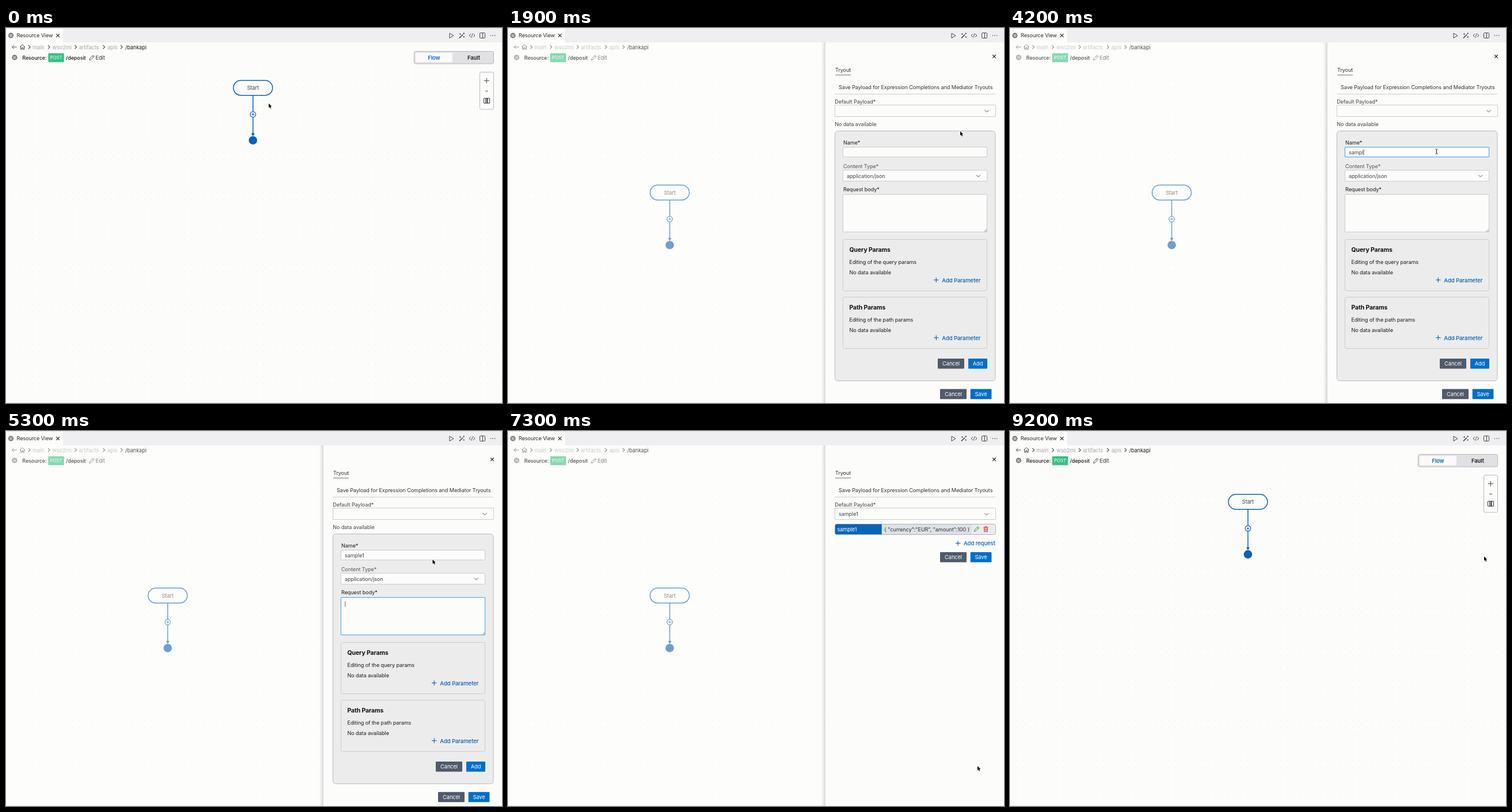
Recreate the animation shown at these times as an HTML page with a canvas. Size 861 by 650 pixels, loop 9300 ms.

```html
<!DOCTYPE html>
<html lang="en">
<head>
<meta charset="utf-8">
<title>Resource View</title>
<style>
html, body { margin: 0; width: 861px; height: 650px; overflow: hidden; background: #fcfcfc; }
canvas { display: block; }
</style>
</head>
<body>
<canvas id="stage" width="861" height="650"></canvas>
<script>
const W = 861, H = 650, LOOP = 9300, STEP = 100;
const BLUE = '#0b62b5', LINK = '#0a5fae', BTN = '#006fc9', SLATE = '#505a6a', PAPER = '#fcfcfb';
const INK = '#1c1c1c', SOFT = '#444', EDGE = '#cbcbcf', FOCUS = '#45a3dc';
const BODY = ['{', '  "currency":"EUR",', '  "amount":100', '}'];

// Event times in ms
const T = { open: 600, form: 1700, name: 2800, type: 3200, key: 170, body: 5000, paste: 5700, add: 7000, close: 8930 };

// Pointer path: time, x, y
const PATH = [
  [0, 456, 130.8], [100, 456, 130.8], [500, 448, 108], [1000, 448, 108], [1600, 785, 179],
  [2000, 785, 179], [2600, 740, 214], [4600, 740, 214], [5000, 740.5, 222.8], [6000, 740.5, 222.8],
  [6800, 815, 580.8], [7600, 815, 580.8], [8500, 823, 217.5], [9300, 823, 217.5]
];

const c = document.getElementById('stage').getContext('2d');
const clamp = v => Math.max(0, Math.min(1, v));
const easeOut = v => 1 - (1 - clamp(v)) ** 2;
const smooth = v => { v = clamp(v); return v * v * (3 - 2 * v); };
const mix = (a, b, p) => a + (b - a) * p;

function text(s, x, y, color = INK, size = 9.15, weight = 400, align = 'left') {
  c.font = `${weight} ${size}px Inter, "Open Sans", sans-serif`;
  c.letterSpacing = -0.012 * size + 'px';
  c.textAlign = align;
  c.textBaseline = 'alphabetic';
  c.fillStyle = color;
  c.fillText(s, x, y + size * 0.36);
}

function box(x, y, w, h, r, fill, stroke, lw = 1) {
  c.beginPath();
  c.roundRect(x, y, w, h, r);
  paint(fill, stroke, lw);
}

function circle(x, y, r, fill, stroke, lw = 1) {
  c.beginPath();
  c.arc(x, y, r, 0, 7);
  paint(fill, stroke, lw);
}

function paint(fill, stroke, lw) {
  if (fill) { c.fillStyle = fill; c.fill(); }
  if (stroke) { c.strokeStyle = stroke; c.lineWidth = lw; c.stroke(); }
}

// Polyline through a flat list of coordinates, relative to x, y
function line(x, y, pts, color = SOFT, lw = 1, fill) {
  c.beginPath();
  for (let i = 0; i < pts.length; i += 2) c.lineTo(x + pts[i], y + pts[i + 1]);
  if (fill) c.closePath();
  paint(fill, color, lw);
}

function plus(x, y, r, color, lw = 1) {
  line(x, y, [-r, 0, r, 0], color, lw);
  line(x, y, [0, -r, 0, r], color, lw);
}

function cross(x, y, r) {
  line(x, y, [-r, -r, r, r], '#222', 1.1);
  line(x, y, [-r, r, r, -r], '#222', 1.1);
}

const chevronDown = (x, y) => line(x, y, [-3.5, -1.7, 0, 1.8, 3.5, -1.7], '#555', 1);

function gear(x, y) {
  circle(x, y, 3.7, null, '#4a4a4a', 1.2);
  circle(x, y, 1.8, null, '#4a4a4a', 1);
  for (let i = 0; i < 8; i++) {
    const a = i * Math.PI / 4, u = Math.cos(a), v = Math.sin(a);
    line(x, y, [u * 3.6, v * 3.6, u * 4.5, v * 4.5], '#4a4a4a', 1.2);
  }
}

function pencil(x, y, color) {
  line(x, y, [-4.2, 4.2, -3.4, 1.2, 2.2, -4.2, 4.2, -2.2, -1.4, 3.4, -4.2, 4.2], color, 0.9);
  line(x, y, [0.9, -2.9, 2.9, -0.9], color, 0.8);
}

function trash(x, y) {
  const red = '#c8342c';
  line(x, y, [-4, -3, 4, -3], red, 1.1);
  line(x, y, [-1.3, -3, -1.3, -4.2, 1.3, -4.2, 1.3, -3], red, 0.9);
  line(x, y, [-3, -2.6, -2.6, 4.2, 2.6, 4.2, 3, -2.6], red, 1.1);
  for (const d of [-1, 1]) line(x, y, [d, -1.4, d, 2.8], red, 0.9);
}

function button(s, x, y, w, color) {
  box(x, y, w, 17.5, 1, color);
  text(s, x + w / 2, y + 9, '#fff', 9.3, 400, 'center');
}

function addLink(s, x, y) {
  plus(x, y - 0.5, 4.2, LINK, 1.1);
  text(s, x + 10, y, LINK, 9.6, 500);
}

function tabBar() {
  c.fillStyle = '#efeff1';
  c.fillRect(0, 0, W, 25);
  c.fillStyle = '#e2e2ee';
  c.fillRect(0, 0, W, 1);
  c.fillStyle = PAPER;
  c.fillRect(0, 1, 99, 24);
  gear(8.5, 13);
  text('Resource View', 18.5, 13.2, '#2a2a2a');
  cross(90, 13, 2.9);
  line(770, 9, [0, 0, 7, 4.2, 0, 8.4], SOFT, 1, 'transparent');
  line(787, 17.5, [0, 0, 6, -6], SOFT, 1.7);
  plus(788.5, 10.5, 1.6, SOFT, 0.8);
  plus(794.7, 9.5, 1.6, SOFT, 0.8);
  plus(794.7, 15.5, 1.4, SOFT, 0.8);
  line(809, 13, [-2.3, -2.8, -4.8, 0, -2.3, 2.8]);
  line(809, 13, [2.3, -2.8, 4.8, 0, 2.3, 2.8]);
  line(809, 13, [1, -3.8, -1, 3.8], SOFT, 0.9);
  box(822.5, 8.5, 9, 9, 1, null, SOFT);
  line(827.5, 8.5, [0, 0, 0, 9]);
  for (const d of [-3.5, 0, 3.5]) circle(845 + d, 13, 0.8, SOFT);
}

function header() {
  line(10.5, 33, [8.5, 0, 0, 0], '#555');
  line(10.5, 33, [3.5, -3.3, 0, 0, 3.5, 3.3], '#555');
  line(28.5, 33, [-4.5, 0, 0, -4.2, 4.5, 0], '#444');
  line(28.5, 33, [-3.2, -1, -3.2, 4, -1, 4, -1, 1, 1, 1, 1, 4, 3.2, 4, 3.2, -1], '#444');
  for (const x of [40.5, 74.5, 121, 170, 200.5])
    line(x, 33, [-1.6, -3.2, 1.6, 0, -1.6, 3.2], '#444', 1.1);
  [['main', 46], ['wso2mi', 80.5], ['artifacts', 126.5], ['apis', 176]]
    .forEach(([s, x]) => text(s, x, 33.2, '#a9a9ad', 9.3));
  gear(15, 51);
  box(73.3, 43.7, 27.4, 15.5, 1, '#36c183');
  text('POST', 87, 51.5, '#fff', 7.9, 400, 'center');
  pencil(149, 51.5, '#444');
  text('Edit', 155.5, 51.5, '#333', 9.3);
}

// Title text keeps more of its weight when the view is dimmed
function titles(dim) {
  c.globalAlpha = 1 - 0.25 * dim;
  text('/bankapi', 207, 33.2, INK, 9.2);
  text('Resource:', 28.3, 51.5, INK, 9, 500);
  text('/deposit', 104, 51.5, INK, 9, 500);
  c.globalAlpha = 1;
}

function controls() {
  box(708.5, 40.5, 138, 21.5, 3, '#e1e1e4', '#b4b4bc');
  box(711, 43, 64, 16.5, 2, '#fafafa');
  text('Flow', 743, 51.5, '#0a62c0', 9.4, 600, 'center');
  text('Fault', 812, 51.5, INK, 9.4, 600, 'center');
  box(822.5, 76.5, 24, 64.5, 2.5, PAPER, '#b8b8c4');
  plus(834.3, 91.3, 4.7, '#444');
  line(834.5, 109.3, [-2.3, 0, 2.3, 0], '#444');
  box(829.5, 121.8, 10, 8.5, 0.5, null, '#333');
  c.fillStyle = '#333';
  c.fillRect(832.5, 122, 1.6, 8);
  c.fillRect(835, 122, 1.6, 8);
}

function dots() {
  const gap = 16 / 1.4;
  c.fillStyle = '#e3e3ee';
  for (let y = 67.5; y < H; y += gap)
    for (let x = 12; x < W; x += gap) c.fillRect(Math.round(x), Math.round(y), 1, 1);
}

function diagram(x, y) {
  line(x, y, [0, 13, 0, 82], BLUE, 1.5);
  box(x - 34, y - 13, 68, 26, 13, PAPER, BLUE, 1.5);
  text('Start', x, y, '#444', 9.3, 400, 'center');
  circle(x, y + 46, 4.8, PAPER, BLUE, 1.2);
  plus(x, y + 46, 2.4, BLUE, 1.1);
  line(x, y, [-2.6, 79, 2.6, 79, 0, 83.5], BLUE, 0.6, BLUE);
  circle(x, y + 91, 7.3, BLUE);
}

// Borders sit on half pixels to stay crisp
function field(x, y, w, h, focused) {
  box(x + 0.5, y + 0.5, w, h, 0.5, PAPER, focused ? FOCUS : EDGE);
}

const caret = (x, y) => line(x, y, [0, -5, 0, 5], '#555', 0.9);

function params(kind, y) {
  box(581.5, y, 250, 89, 3, null, EDGE);
  text(kind + ' Params', 592.5, y + 17.8, '#111', 10.5, 700);
  text(`Editing of the ${kind.toLowerCase()} params`, 592.5, y + 39.6);
  text('No data available', 592.5, y + 57);
  addLink('Add Parameter', 743.3, y + 70.7);
}

function form(t) {
  box(567.5, 178.5, 278.5, 433, 5, '#ececec', '#b9b9c0');
  text('Name*', 582, 198.3);
  const onName = t >= T.name && t < T.body;
  field(581, 206, 250, 17, onName);
  const typed = 'sample1'.slice(0, Math.max(0, Math.floor((t - T.type) / T.key)));
  text(typed, 588, 215.3, SOFT);
  if (onName) caret(588.8 + (typed ? c.measureText(typed).width : 0), 215.3);
  text('Content Type*', 582, 239.3, '#555');
  field(581, 246, 250, 19);
  text('application/json', 588, 256.3, SOFT);
  chevronDown(816.5, 256.3);
  text('Request body*', 582, 280.2);
  field(581, 288, 250, 65, t >= T.body);
  line(831, 353, [-4.5, 0, 0, -4.5], '#777', 0.8);
  line(831, 353, [-2, 0, 0, -2], '#777', 0.8);
  if (t >= T.paste) {
    BODY.forEach((s, i) => text(s, 588, 300 + i * 12.5, SOFT));
    caret(592.5, 337.5);
  } else if (t >= T.body) caret(588.8, 300);
  params('Query', 366.5);
  params('Path', 466.5);
  button('Cancel', 746, 573, 46, SLATE);
  button('Add', 799, 573, 33, BTN);
}

function savedRow() {
  box(567.5, 161.5, 279, 18, 3, '#ebebed', '#b0b0ba');
  c.fillStyle = '#dce1e5';
  c.fillRect(649, 162, 156, 17);
  box(568, 161.5, 80.8, 17.5, [2.5, 0, 0, 2.5], '#0a64b6');
  text('sample1', 571.5, 170.3, '#fff', 9.2);
  text('{ "currency":"EUR", "amount":100 }', 653, 170.3, '#333');
  pencil(813.5, 170, '#3b7d3b');
  trash(829.5, 170);
}

function panel(t, shown) {
  c.save();
  c.beginPath();
  c.rect(0, 25, W, H - 25);
  c.clip();
  c.translate(310 * (1 - shown), 0);
  const shade = c.createLinearGradient(544, 0, 551, 0);
  shade.addColorStop(0, 'rgba(90,90,110,0)');
  shade.addColorStop(1, 'rgba(90,90,110,.22)');
  c.fillStyle = shade;
  c.fillRect(544, 25, 7, H);
  c.fillStyle = PAPER;
  c.fillRect(551, 25, 310, H);

  const saved = t >= T.add, editing = t >= T.form && !saved;
  cross(844, 49.3, 2.8);
  text('Tryout', 568, 72.5, '#333');
  line(568, 81.5, [0, 0, 27, 0], '#777');
  text('Save Payload for Expression Completions and Mediator Tryouts', 574, 102.3, '#333');
  line(567, 114.5, [0, 0, 279, 0], '#cfcfd2');
  text('Default Payload*', 567.3, 127.3, SOFT);
  field(567, 133, 279, 20);
  if (saved) text('sample1', 574, 144.2, SOFT);
  chevronDown(831, 144);
  if (saved) savedRow();
  else text('No data available', 567.3, 166.5, SOFT);
  if (editing) form(t);
  else addLink('Add request', 781, saved ? 195 : 180);
  const y = editing ? 625.7 : saved ? 210 : 195;
  button('Cancel', 750, y, 46, SLATE);
  button('Save', 802.7, y, 36.7, BTN);
  c.restore();
}

function pointer(t) {
  const i = Math.max(1, PATH.findIndex(p => p[0] > t));
  const [t0, x0, y0] = PATH[i - 1], [t1, x1, y1] = PATH[i];
  const p = smooth((t - t0) / (t1 - t0));
  const x = mix(x0, x1, p), y = mix(y0, y1, p);
  if (t >= 2500 && t < 4800) {
    line(x + 0.5, y, [0, -3.5, 0, 3.5], '#222', 1);
    for (const d of [-1, 1]) line(x + 0.5, y, [-2, d * 4.4, 0, d * 3.5, 2, d * 4.4], '#222', 0.9);
    return;
  }
  c.lineJoin = 'round';
  const arrow = [0, 0, 0, 7.4, 1.7, 5.9, 3, 8.8, 4.3, 8.2, 3.1, 5.4, 5.3, 5.3];
  line(x, y, arrow, '#fff', 1.4, '#000');
  line(x, y, arrow, null, 0, '#000');
  c.lineJoin = 'miter';
}

function draw(t) {
  const closing = t >= T.close;
  const shown = closing ? 1 - easeOut((t - T.close) / 200) : easeOut((t - T.open + 50) / 350);
  const moved = closing ? 1 - easeOut((t - T.close) / 400) : easeOut((t - T.open) / 400);
  c.fillStyle = PAPER;
  c.fillRect(0, 0, W, H);
  dots();
  diagram(mix(428.7, 280.7, moved), mix(103.7, 285.2, moved));
  header();
  controls();
  c.fillStyle = `rgba(252,252,251,${0.4 * shown})`;
  c.fillRect(0, 25, W, H - 25);
  titles(shown);
  c.fillStyle = '#ebebf3';
  c.fillRect(0, H - 1, W, 1);
  if (shown > 0) panel(t, shown);
  tabBar();
  pointer(t);
}

const start = performance.now();
function tick(now) {
  const t = (Math.max(0, now - start) + 5) % LOOP;
  draw(Math.floor(t / STEP) * STEP);
  requestAnimationFrame(tick);
}
draw(0);
requestAnimationFrame(tick);
</script>
</body>
</html>
```
